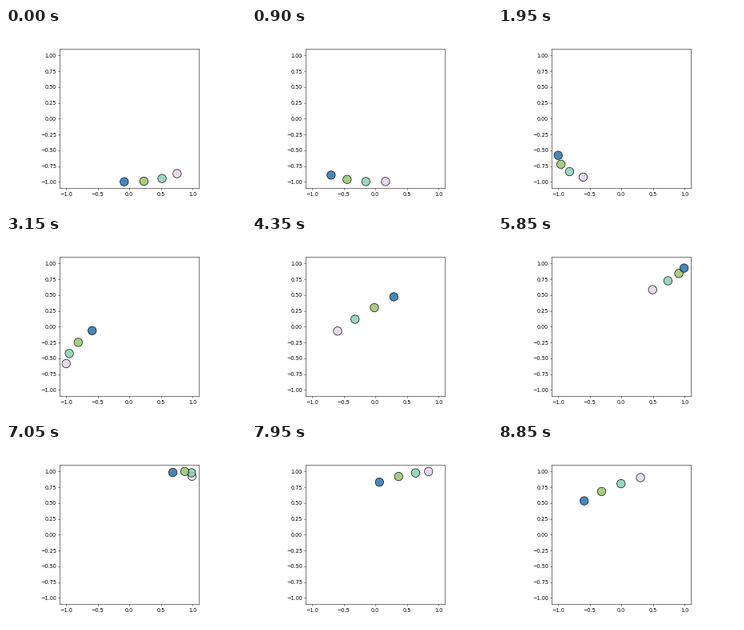
These frames come from a looping animation (300 px wide and 225 px high, 9000 ms). A matplotlib script:

```python
import numpy as np
import matplotlib.pyplot as plt
from matplotlib.animation import FuncAnimation
from matplotlib.colors import to_rgba

W, H, DPI = 300, 225, 47
FRAMES, INTERVAL = 60, 150
START, STEP, GAP = 3.1577, 0.02316, 0.0625
COLORS = ["#e0d3ea", "#81ceaf", "#90c162", "#186aa9"]  # tail to head
ALPHA = 0.8

plt.rcParams["font.family"] = "DejaVu Sans"
# The hair above a whole pixel keeps the canvas from being rounded down.
fig, ax = plt.subplots(figsize=((W + 0.01) / DPI, (H + 0.01) / DPI), dpi=DPI)
# Margins of a default 6.4 x 4.8 inch figure at this dpi.
fx, fy = 6.4 * DPI / W, 4.8 * DPI / H
fig.subplots_adjust(left=0.125 * fx, right=0.9 * fx,
                    bottom=0.11 * fy, top=0.88 * fy)
ax.set(xlim=(-1.1, 1.1), ylim=(-1.1, 1.1), aspect="equal")
ax.set_xticks(np.arange(-1, 1.1, 0.5))
ax.set_yticks(np.arange(-1, 1.1, 0.25))


def positions(frame):
    """Points trailing one another along a 5:3 Lissajous curve."""
    lag = GAP * np.arange(len(COLORS))[::-1]
    s = START + STEP * frame - lag
    return np.column_stack([np.sin(5 * s), np.cos(3 * s)])


dots = ax.scatter(*positions(0).T, s=256, linewidths=1, edgecolors="black",
                  facecolors=[to_rgba(c, ALPHA) for c in COLORS], zorder=2)


def update(frame):
    dots.set_offsets(positions(frame))
    return [dots]


anim = FuncAnimation(fig, update, frames=FRAMES, interval=INTERVAL,
                     repeat=True, repeat_delay=0)
plt.show()
```
